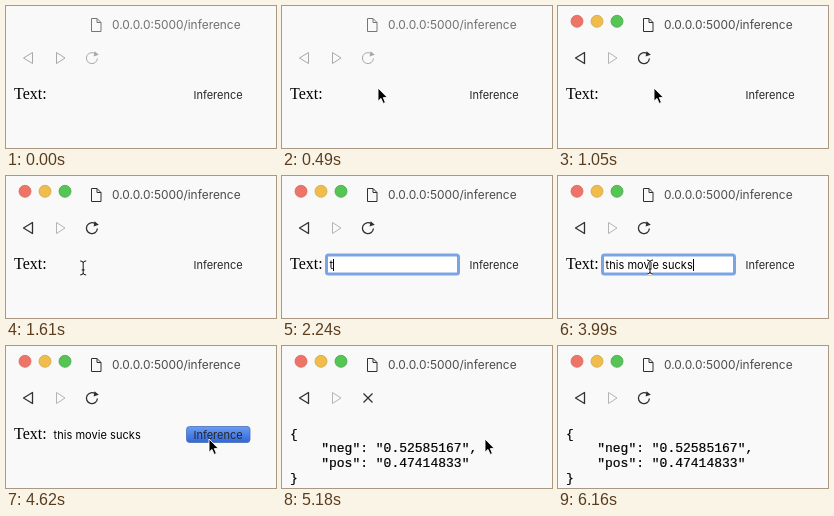
An HTML page for the animation above (6.44 s loop, 270 px wide and 142 px high).

```html
<!DOCTYPE html>
<html lang="en">
<head>
<meta charset="utf-8">
<title>Inference form</title>
<style>
  html, body { margin: 0; width: 100%; height: 100%; overflow: hidden; background: #f9f9f9; }
  svg { display: block; width: 100vw; height: 100vh; }
  text { white-space: pre; }
  .ui { font-family: Inter, "Liberation Sans", sans-serif; font-size: 11px; fill: #262626; }
  .url { font-size: 11.9px; fill: #4a4a4a; }
  .label { font: 16px "Liberation Serif", Times, serif; }
  .json { font: 13px "Liberation Mono", Courier, monospace; stroke: #000; stroke-width: .2; }
  .line { fill: none; stroke: #303030; stroke-width: 1.3; stroke-linejoin: round; }
  .thin { stroke-width: 1; }
  .off { stroke: #b4b4b4; stroke-width: 1; }
  .idle .url { fill: #707070; }
  .idle .line { stroke: #a8a8a8; stroke-width: 1; }
  .idle .thin { stroke: #777; }
  .idle .head { fill: #a8a8a8; }
  .idle #lights { display: none; }
</style>
</head>
<body>
<svg id="stage" viewBox="0 0 270 142">
  <defs>
    <linearGradient id="blue" x2="0" y2="1">
      <stop offset="0" stop-color="#6b9df2"/>
      <stop offset="1" stop-color="#3166da"/>
    </linearGradient>
  </defs>

  <g id="chrome">
    <g id="lights" stroke-width=".8">
      <circle cx="19" cy="15.3" r="6" fill="#ee7468" stroke="#d9695e"/>
      <circle cx="39" cy="15.3" r="6" fill="#f0bd4c" stroke="#d3a648"/>
      <circle cx="59" cy="15.3" r="6" fill="#55c656" stroke="#48a84a"/>
    </g>
    <path class="line thin" d="M85.5 12.5h5.5l4 4v9h-9.5z M91 12.5v4h4"/>
    <text class="ui url" x="106" y="23">0.0.0.0:5000/inference</text>
    <path class="line" d="M17.5 52 26.5 46.5V57.5z"/>
    <path class="line off" d="M59 52 50.5 46.5V57.5z"/>
    <g id="reload">
      <path class="line" d="M89.3 47.8A5.5 5.5 0 1 0 91.4 52.5"/>
      <path class="head" fill="#303030" d="M88.6 45.2 92.8 48.8 87.6 50.6z"/>
    </g>
    <path id="stop" class="line" d="M81.5 47.5l9 9m0-9l-9 9"/>
  </g>

  <g id="form">
    <text class="label" x="8" y="93">Text:</text>
    <rect id="ring" x="44.5" y="79" width="132" height="19" rx="2" fill="#fff" stroke="#7ca4e2" stroke-width="3"/>
    <text id="typed" class="ui" x="47.5" y="93" letter-spacing=".05" style="fill:#000"></text>
    <path id="caret" d="M0 83v12" stroke="#000"/>
    <rect id="press" x="180.5" y="80.5" width="63.5" height="16" rx="3" fill="url(#blue)" stroke="#4a70b8" stroke-width=".8"/>
    <text class="ui" x="187.5" y="93">Inference</text>
  </g>

  <g id="result" class="json">
    <text x="8" y="92">{</text>
    <text x="8" y="106">    "neg": "0.52585167",</text>
    <text x="8" y="121">    "pos": "0.47414833"</text>
    <text x="8" y="136">}</text>
  </g>

  <path id="arrow" d="M0 0V13.2L3 10.4 5.2 15.4 7.4 14.5 5.3 9.6H9.4z" stroke="#fff" stroke-width=".9"/>
  <g id="beam" fill="none">
    <path id="bar" d="M-3-7Q0-7 0-5Q0-7 3-7M0-5V5M-3 7Q0 7 0 5Q0 7 3 7M-1.5 2h3" stroke="#fff" stroke-width="2.4"/>
    <use href="#bar" style="display:none"/>
    <path d="M-3-7Q0-7 0-5Q0-7 3-7M0-5V5M-3 7Q0 7 0 5Q0 7 3 7M-1.5 2h3" stroke="#111"/>
  </g>
</svg>
<script>
const LOOP = 6440, TICK = 70;
const PHRASE = "this movie sucks";
const FIRST_KEY = 2170, KEY_GAP = 98;
const FIELD_END = 178;

// Each move eases from a to b with a sideways sway, then rests until its end
const MOVES = [
  { at: 70, dur: 420, end: 1330, a: [262, 132], b: [96, 82], sway: 0 },
  { at: 1330, dur: 350, end: 2100, a: [96, 84], b: [75, 90], sway: 8, waves: 1, text: true },
  { at: 3990, dur: 560, end: 6090, a: [92, 91], b: [203, 93], sway: -10, waves: 2, text: true },
  { at: 6020, dur: 70, end: 6160, a: [203, 93], b: [203, 103], sway: 0 }
];

const el = id => document.getElementById(id);
const show = (id, on) => { el(id).style.display = on ? "" : "none"; };
const within = (t, a, b) => t >= a && t < b;
const clamp = (v, lo, hi) => Math.min(hi, Math.max(lo, v));
const mix = (a, b, k) => a + (b - a) * k;
const ease = k => k * k * (3 - 2 * k);

function drawPointer(t) {
  const m = MOVES.find(m => within(t, m.at, m.end));
  let kind = "";
  if (m) {
    const k = ease(clamp((t - m.at) / m.dur, 0, 1));
    const x = mix(m.a[0], m.b[0], k);
    const y = mix(m.a[1], m.b[1], k) + (m.sway && m.sway * Math.sin(Math.PI * m.waves * k));
    kind = m.text && x < FIELD_END ? "beam" : "arrow";
    el(kind).setAttribute("transform", `translate(${x} ${y})`);
  }
  for (const id of ["arrow", "beam"]) show(id, id === kind);
}

function drawForm(t) {
  const focused = within(t, 1820, 4550);
  const typed = el("typed");
  const count = Math.floor((t - FIRST_KEY) / KEY_GAP) + 1;
  typed.textContent = PHRASE.slice(0, clamp(count, 0, PHRASE.length));
  show("form", t < 5110);
  show("result", t >= 5110);
  show("ring", focused);
  show("caret", focused);
  show("press", within(t, 4550, 4760));
  if (focused) {
    const x = Math.round(47.5 + typed.getComputedTextLength()) + 0.5;
    el("caret").setAttribute("transform", `translate(${x})`);
  }
}

function draw(now) {
  const t = Math.floor(now % LOOP / TICK) * TICK;
  const loading = within(t, 4830, 5250);
  el("chrome").classList.toggle("idle", t < 560);
  show("reload", !loading);
  show("stop", loading);
  drawForm(t);
  drawPointer(t);
}

const start = performance.now();
function frame() {
  draw(performance.now() - start);
  requestAnimationFrame(frame);
}
frame();
</script>
</body>
</html>
```
